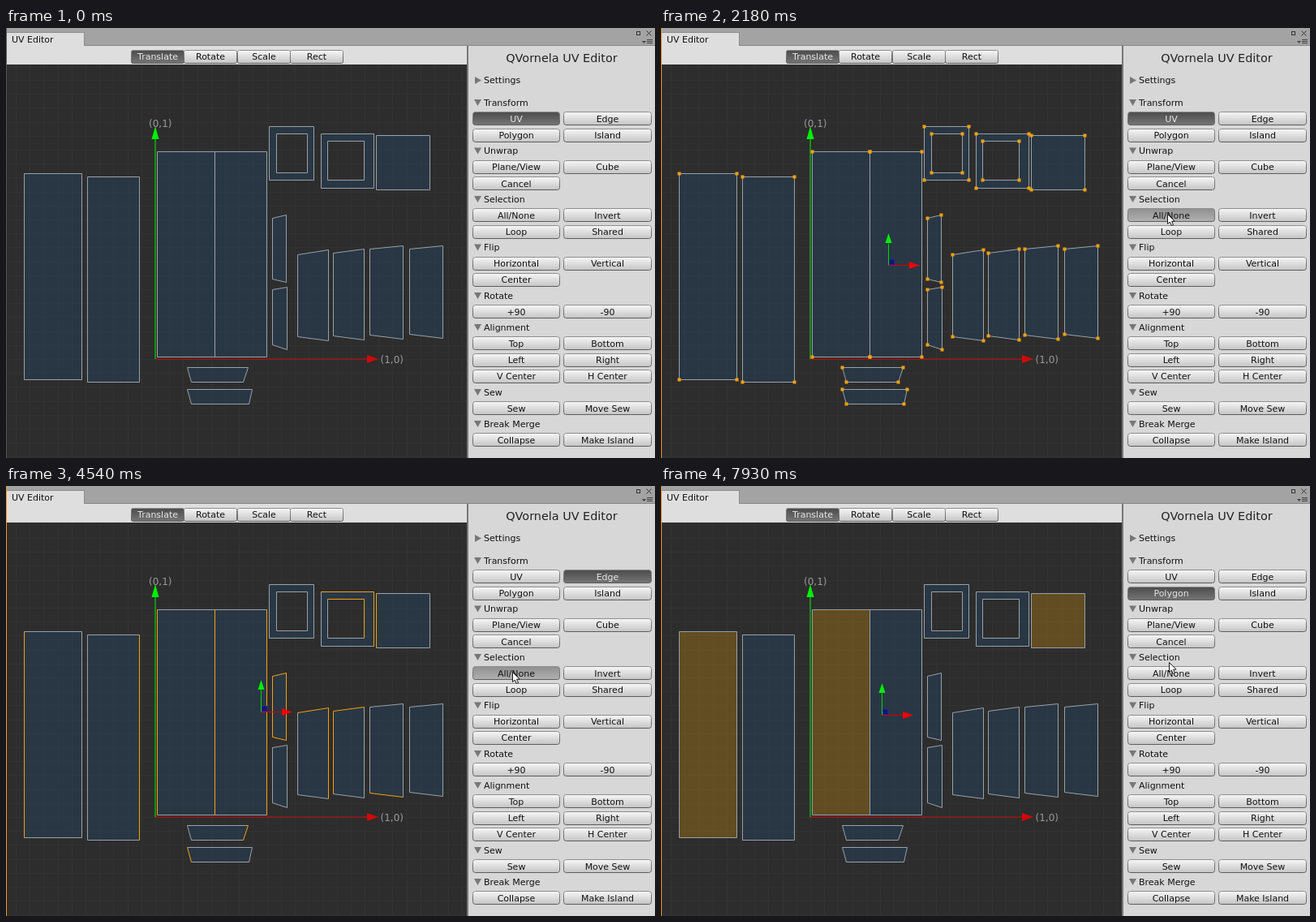
Write an HTML page with a canvas that moves like this. It is 800x530 px and loops after 7.99 s.

```html
<!DOCTYPE html>
<html>
<head>
<meta charset="utf-8">
<style>
html, body { margin: 0; width: 100%; height: 100%; overflow: hidden; background: #2d2d2d; }
canvas { display: block; }
</style>
</head>
<body>
<canvas id="stage" width="800" height="530"></canvas>
<script>
const ctx = document.getElementById('stage').getContext('2d');
const LOOP = 7990;
const ORANGE = '#f5a00c', LINE = '#98a1a8';
const FONT = 'px "DejaVu Sans", sans-serif';

// Pieces: points run clockwise from the top left, so edges are top, right, bottom, left.
const rect = (x0, y0, x1, y1) => [[x0, y0], [x1, y0], [x1, y1], [x0, y1]];
const side = (x0, x1, tl, tr, br, bl) => [[x0, tl], [x1, tr], [x1, br], [x0, bl]];
const tray = (y0, y1, tl, tr, br, bl) => [[tl, y0], [tr, y0], [br, y1], [bl, y1]];
const pieces = {
  A: [rect(22, 179, 93, 433)],
  B: [rect(100, 183, 164, 436)],
  C: [rect(186, 152, 257, 405)],
  c: [rect(257, 152, 321, 405)],
  D: [rect(324, 121, 379, 187), rect(333, 130, 371, 178)],
  E: [rect(388, 130, 453, 197), rect(396, 139, 441, 187)],
  F: [rect(456, 132, 522, 199)],
  G: [side(328, 345, 234, 230, 313, 309)],
  H: [side(328, 346, 322, 319, 396, 390)],
  I: [side(359, 397, 279, 273, 385, 380)],
  J: [side(403, 441, 277, 272, 384, 379)],
  K: [side(448, 489, 272, 268, 383, 378)],
  L: [side(497, 538, 272, 268, 382, 377)],
  M: [tray(418, 436, 223, 298, 292, 228)],
  N: [tray(445, 463, 223, 303, 299, 228)]
};
const someEdges = 'A3 B1 C13 c1 E01 F3 G0123 I01 J03 K2 M1 N3';

const vertBox = [161, 112, 415, 208];
const edgeBox = [175, 222, 420, 312];
const mid = [280, 292];

// Selection over time: start, kind, what, gizmo position.
const states = [
  [0, 'vert', ''],
  [900, 'vert', 'some', [280, 159]],
  [1620, 'vert', ''],
  [1940, 'vert', 'all', mid],
  [2260, 'vert', ''],
  [2540, 'vert', 'all', mid],
  [2980, 'edge', 'all', mid],
  [3500, 'edge', ''],
  [4170, 'edge', 'some', [314, 278]],
  [4610, 'edge', ''],
  [4900, 'edge', 'all', mid],
  [5170, 'edge', ''],
  [5460, 'edge', 'all', mid],
  [6400, 'poly', 'all', mid],
  [6760, 'poly', 'F', [489, 165]],
  [7150, 'poly', 'FC', [354, 268]],
  [7420, 'poly', 'FCA', [272, 282]]
];

// Mouse button held on a panel button.
const presses = [
  ['All/None', 1550, 1620], ['All/None', 1870, 1940], ['All/None', 2180, 2260],
  ['All/None', 2470, 2540], ['Edge', 2900, 2980], ['All/None', 4500, 4610],
  ['All/None', 4810, 4900], ['All/None', 5100, 5170], ['All/None', 5410, 5460],
  ['Polygon', 6330, 6400]
];

// Cursor path: time, x, y.
const path = [
  [50, 729, 330], [400, 161, 112], [430, 161, 112], [770, 415, 208], [900, 415, 208],
  [1300, 609, 240], [1480, 624, 229], [2570, 624, 229], [2880, 721, 116], [3000, 721, 116],
  [3250, 600, 170], [3490, 175, 222], [3530, 175, 222], [4070, 420, 312], [4170, 420, 312],
  [4480, 624, 229], [5600, 624, 229], [5920, 707, 106], [6200, 660, 126], [6320, 632, 132],
  [6420, 632, 132], [6720, 489, 165], [6780, 489, 165], [6990, 289, 233], [7120, 232, 240],
  [7180, 232, 240], [7400, 89, 300], [7650, 89, 300], [7920, 626, 217]
];

const sections = [
  ['Transform', 92, 'UV', 'Edge', 'Polygon', 'Island'],
  ['Unwrap', 151.5, 'Plane/View', 'Cube', 'Cancel'],
  ['Selection', 211, 'All/None', 'Invert', 'Loop', 'Shared'],
  ['Flip', 270.5, 'Horizontal', 'Vertical', 'Center'],
  ['Rotate', 330, '+90', '-90'],
  ['Alignment', 369, 'Top', 'Bottom', 'Left', 'Right', 'V Center', 'H Center'],
  ['Sew', 449, 'Sew', 'Move Sew'],
  ['Break Merge', 488, 'Collapse', 'Make Island']
];
const modeButton = { vert: 'UV', edge: 'Edge', poly: 'Polygon' };

function box(x, y, w, h, color) {
  ctx.fillStyle = color;
  ctx.fillRect(x, y, w, h);
}

function text(str, x, y, color, size = 11, align = 'left') {
  ctx.font = size + FONT;
  ctx.textAlign = align;
  ctx.fillStyle = color;
  ctx.fillText(str, x, y);
}

function line(a, b, color) {
  ctx.strokeStyle = color;
  ctx.lineWidth = 1;
  ctx.beginPath();
  ctx.moveTo(a[0] + 0.5, a[1] + 0.5);
  ctx.lineTo(b[0] + 0.5, b[1] + 0.5);
  ctx.stroke();
}

function shape(points, color) {
  ctx.fillStyle = color;
  ctx.beginPath();
  points.forEach(p => ctx.lineTo(p[0], p[1]));
  ctx.closePath();
  ctx.fill();
}

function vgrad(y0, y1, top, bottom) {
  const g = ctx.createLinearGradient(0, y0, 0, y1);
  g.addColorStop(0, top);
  g.addColorStop(1, bottom);
  return g;
}

const looks = {
  normal: ['#f8f8f8', '#c3c3c3', '#111'],
  held: ['#8e8e8e', '#b2b2b2', '#111'],
  on: ['#4a4a4a', '#777777', '#e6e6e6']
};

function button(label, x, cy, w, look, radius = 3) {
  const [top, bottom, ink] = looks[look], y = Math.round(cy) - 8;
  ctx.beginPath();
  ctx.roundRect(x + 0.5, y + 0.5, w - 1, 16, radius);
  ctx.fillStyle = vgrad(y, y + 17, top, bottom);
  ctx.fill();
  ctx.strokeStyle = vgrad(y, y + 17, '#8f8f8f', '#5c5c5c');
  ctx.lineWidth = 1;
  ctx.stroke();
  text(label, x + w / 2, Math.round(cy + 4.2), ink, 11, 'center');
}

function drawChrome(focused) {
  box(0, 0, 800, 22, '#a3a3a3');
  box(97, 21, 703, 1, '#868686');
  box(1, 5, 96, 18, '#8c8c8c');
  box(1, 6, 95, 17, '#dedede');
  text('UV Editor', 7, 18, '#111');
  box(1, 22, 567, 23, '#dedede');
  ['Translate', 'Rotate', 'Scale', 'Rect'].forEach((label, i) =>
    button(label, 154 + Math.round(i * 65.3), 35, 66, i ? 'normal' : 'on', 2));

  // Window controls
  ctx.strokeStyle = '#333';
  ctx.strokeRect(777.5, 4.5, 4, 4);
  line([789, 3], [795, 9], '#333');
  line([795, 3], [789, 9], '#333');
  shape([[784, 16], [789, 16], [786.5, 19]], '#444');
  for (let i = 0; i < 3; i++) box(790, 14 + i * 2, 7, 1, '#444');
  box(0, 0, 1, 530, focused ? '#f39419' : '#555');
}

function drawPanel(t, mode) {
  box(568, 22, 2, 508, '#777');
  box(570, 22, 230, 508, '#d7d7d7');
  text('QVornela UV Editor', 685, 42, '#222', 14.4, 'center');
  shape([[578, 60], [586, 64.5], [578, 69]], '#777');
  text('Settings', 589, 68, '#111');
  for (const [title, y, ...labels] of sections) {
    shape([[577, y - 4], [586, y - 4], [581.5, y + 4]], '#777');
    text(title, 589, Math.floor(y + 4), '#111');
    labels.forEach((label, i) => {
      const held = presses.some(([name, a, b]) => name === label && t >= a && t < b);
      const look = label === modeButton[mode] ? 'on' : held ? 'held' : 'normal';
      const row = Math.floor(i / 2);
      button(label, i % 2 ? 687 : 575, y + 19.4 + row * 20.4, i % 2 ? 109 : 108, look);
    });
  }
}

function drawGrid() {
  box(1, 45, 567, 485, '#2d2d2d');
  const step = 17.2;
  for (let x = 184 - 10 * step; x < 568; x += step) box(Math.round(x), 45, 1, 485, '#323232');
  for (let y = 408 - 21 * step; y < 530; y += step) if (y > 45) box(1, Math.round(y), 567, 1, '#323232');
}

// The axes lie on pixel borders, so their lines spread softly over two pixels.
function drawAxes() {
  line([183.5, 407.5], [446, 407.5], '#d00808');
  line([183.5, 407.5], [183.5, 135], '#00f000');
  shape([[184, 121], [188.5, 137], [179.5, 137]], '#00f000');
  shape([[459, 408], [445, 403], [445, 413]], '#d00808');
  text('(0,1)', 176, 122, '#999', 12);
  text('(1,0)', 461.5, 413, '#999', 12);
}

function inside([x, y], [x0, y0, x1, y1]) {
  return x >= x0 && x <= x1 && y >= y0 && y <= y1;
}

function edgeOn(key, i) {
  return someEdges.split(' ').some(s => s[0] === key && s.includes(i, 1));
}

function drawPieces(kind, what) {
  const all = what === 'all';
  for (const key in pieces) {
    const on = kind === 'poly' && (all || what.includes(key));
    ctx.fillStyle = on ? 'rgba(148,106,24,0.52)' : 'rgba(38,66,92,0.5)';
    ctx.beginPath();
    for (const loop of pieces[key]) {
      loop.forEach(([x, y], i) => i ? ctx.lineTo(x + 0.5, y + 0.5) : ctx.moveTo(x + 0.5, y + 0.5));
      ctx.closePath();
    }
    ctx.fill('evenodd');
  }
  const marked = [];
  for (const key in pieces) for (const loop of pieces[key]) loop.forEach((p, i) => {
    const q = loop[(i + 1) % 4];
    const on = kind === 'edge' && (all || what === 'some' && edgeOn(key, i));
    if (on) marked.push([p, q]);
    else line(p, q, LINE);
  });
  marked.forEach(([p, q]) => line(p, q, ORANGE));
  if (kind !== 'vert' || !what) return;
  for (const key in pieces) for (const p of pieces[key].flat())
    if (all || inside(p, vertBox)) box(p[0] - 1.5, p[1] - 1.5, 4, 4, ORANGE);
}

function drawGizmo([x, y]) {
  box(x + 2, y - 6, 6, 6, 'rgba(10,10,130,0.75)');
  ctx.strokeStyle = '#1c1cae';
  ctx.strokeRect(x + 1.5, y - 6.5, 6, 6);
  line([x, y], [x, y - 27], '#00d800');
  line([x, y], [x + 26, y], '#d80000');
  shape([[x + 0.5, y - 39], [x + 4.5, y - 27], [x - 3.5, y - 27]], '#00f000');
  shape([[x + 39, y + 0.5], [x + 26, y - 4], [x + 26, y + 5]], '#f00000');
}

function cursorAt(t) {
  const i = path.findIndex(p => p[0] > t);
  if (i < 0) return path[path.length - 1].slice(1);
  const [t0, x0, y0] = path[i - 1], [t1, x1, y1] = path[i];
  const u = (t - t0) / (t1 - t0), e = u * u * (3 - 2 * u);
  return [x0 + (x1 - x0) * e, y0 + (y1 - y0) * e];
}

function drawMarquee([x0, y0], [x1, y1]) {
  const x = Math.round(x0), y = Math.round(y0), w = Math.round(x1 - x0), h = Math.round(y1 - y0);
  box(x, y, w, h, 'rgba(160,180,200,0.1)');
  ctx.strokeStyle = '#a5adb3';
  ctx.strokeRect(x + 0.5, y + 0.5, w, h);
}

function drawCursor([x, y]) {
  ctx.save();
  ctx.translate(Math.round(x) + 0.5, Math.round(y) + 0.5);
  ctx.beginPath();
  for (const [px, py] of [[0, 0], [0, 12], [2.8, 9.6], [4.8, 14], [7, 13], [5, 8.8], [8.6, 8.6]]) ctx.lineTo(px, py);
  ctx.closePath();
  ctx.fillStyle = '#fff';
  ctx.fill();
  ctx.strokeStyle = '#1c1c1c';
  ctx.lineWidth = 1;
  ctx.stroke();
  ctx.restore();
}

function draw(t) {
  const [, kind, what, gizmo] = states.filter(s => s[0] <= t).pop();
  ctx.lineWidth = 1;
  drawGrid();
  drawAxes();
  drawPieces(kind, what);
  if (gizmo) drawGizmo(gizmo);
  const pos = t >= 50 ? cursorAt(t) : null;
  if (t > 430 && t < 900) drawMarquee(vertBox, pos);
  if (t > 3530 && t < 4170) drawMarquee(edgeBox, pos);
  drawPanel(t, kind);
  drawChrome(t >= 50);
  if (pos) drawCursor(pos);
}

const start = performance.now();
function tick() {
  draw((performance.now() - start) % LOOP);
  requestAnimationFrame(tick);
}
tick();
</script>
</body>
</html>
```
